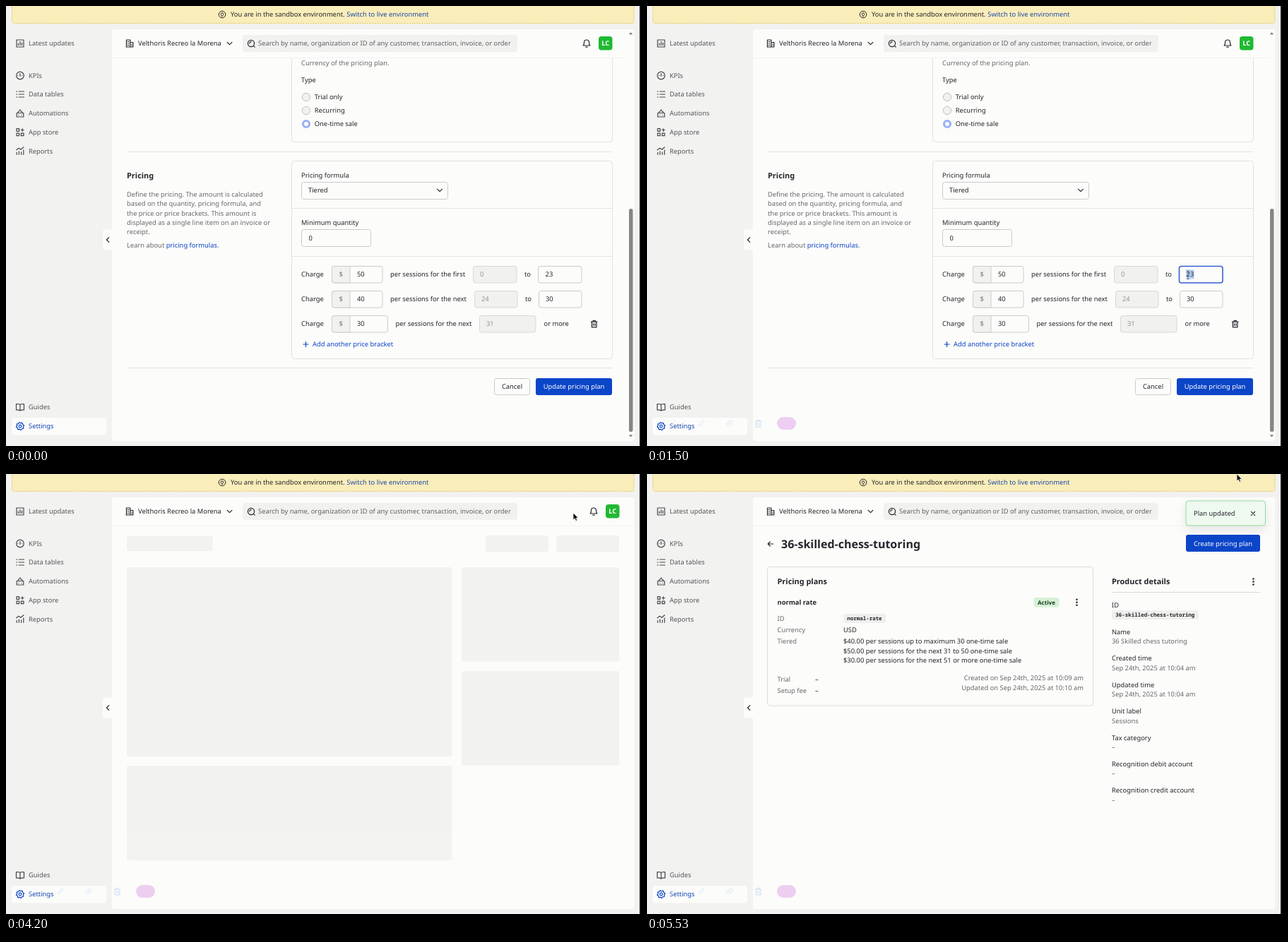
An HTML page that plays this animation: 899 by 623 pixels, repeating every 5610 ms.

```html
<!DOCTYPE html>
<html lang="en">
<head>
<meta charset="utf-8">
<title>Pricing plan</title>
<style>
  html, body { margin: 0; width: 100%; height: 100%; overflow: hidden; background: #f2f2f0; }
  svg { display: block; }
  text { font-family: "Noto Sans", "Open Sans", sans-serif; white-space: pre; text-rendering: geometricPrecision; }
  .mono { font-family: "Noto Sans Mono", "DejaVu Sans Mono", monospace; }
  .icon { fill: none; stroke-linecap: round; stroke-linejoin: round; }
</style>
</head>
<body>
<svg id="stage" width="899" height="623" viewBox="0 0 899 623"></svg>
<script>
const LOOP = 5610;
const INK = '#25262a', GREY = '#67686c', SIDE = '#55565a', MUTE = '#929395';
const BLUE = '#0b45c8', PAPER = '#fcfcfa', SOFT = '#f1f1ef', LINE = '#e2e2df', EDGE = '#cbcbc8', HEADER = '#f3f3f1';

// y is the optical middle of the line
function text(x, y, s, { c = INK, size = 9.36, w = 400, a = 'start', id, mono } = {}) {
  return `<text x="${x}" y="${y + size * 0.36}" font-size="${size}" font-weight="${w}" fill="${c}"
    text-anchor="${a}"${id ? ` id="${id}"` : ''}${mono ? ' class="mono"' : ''}>${s}</text>`;
}
function box(x, y, w, h, fill, { line = 'none', r = 3, lw = 1, more = '' } = {}) {
  return `<rect x="${x}" y="${y}" width="${w}" height="${h}" rx="${r}" fill="${fill}" stroke="${line}" stroke-width="${lw}" ${more}/>`;
}
// paths are drawn around their own centre
function icon(x, y, d, c = '#45464a', w = 1.2) {
  return `<path class="icon" transform="translate(${x} ${y})" d="${d}" stroke="${c}" stroke-width="${w}"/>`;
}
const rule = (x1, x2, y, c = LINE) => `<path d="M${x1} ${y}H${x2}" stroke="${c}"/>`;
const group = (id, body) => `<g id="${id}">${body}</g>`;
const ring = (r, x = 0, y = 0) => `M${x - r} ${y}a${r} ${r} 0 1 0 ${2 * r} 0a${r} ${r} 0 1 0 ${-2 * r} 0`;
const rows = (list, fn) => list.map(fn).join('');

// closed outline with two points per tooth tip and two per gap
function cog(teeth, outer, inner) {
  const points = Array.from({ length: teeth * 4 }, (_, i) => {
    const angle = (i + .5) * Math.PI / (2 * teeth), r = i % 4 < 2 ? outer : inner;
    return `${(r * Math.sin(angle)).toFixed(2)} ${(r * Math.cos(angle)).toFixed(2)}`;
  });
  return `M${points.join('L')}Z`;
}

const D = {
  chart: 'M-5-5H5V5H-5ZM-2.5 2.5V0M0 2.5V-2.5M2.5 2.5V-1',
  gauge: ring(5.3) + 'M0 1V-3M-3 0h.2M2.8 0h.2',
  list: 'M-1.8-4H5.5M-1.8 0H5.5M-1.8 4H5.5M-5.3-4h1M-5.3 0h1M-5.3 4h1',
  robot: 'M-4.8-.5H4.8V5H-4.8ZM-3-.5q0-3 3-3t3 3M0-3.5V-5.5M-2 2.3h.2M1.8 2.3h.2',
  apps: 'M-5-5h3.6v3.6H-5ZM-5 1.4h3.6V5H-5ZM1.4 1.4H5V5H1.4ZM3.2-5.2v4M1.2-3.2h4',
  report: 'M-5.3-1.5L-2-4 1-2 5-5.5M-4.8 5V2M-1.6 5V.5M1.6 5V1.5M4.8 5V-1.5',
  book: 'M0-3.5C-2-5-4-4.5-5.5-4.3V4C-4 3.8-2 3.6 0 5 2 3.6 4 3.8 5.5 4V-4.3C4-4.5 2-5 0-3.5V5',
  gear: ring(1.8) + cog(8, 5.5, 4.4),
  pin: ring(4.8) + 'M0 2.5C-1 1.4-1.7.5-1.7-.5a1.7 1.7 0 0 1 3.4 0C1.7.5 1 1.4 0 2.5Z',
  building: 'M-4.5 5V-5H.8V5M.8-1.5H4.8V5H-5M-2.6-2.5h1.4M-2.6 0h1.4M-2.6 2.5h1.4M2.6 1h.4M2.6 3h.4',
  search: ring(4.6) + 'M3.3 3.3L5.2 5.2M-2.3 0a2.3 2.3 0 0 1 2.3-2.3',
  bell: 'M-4.8 3H4.8C3.4 1.6 3.6 0 3.5-1.5a3.5 3.5 0 0 0-7 0C-3.6 0-3.4 1.6-4.8 3ZM-1.2 5.2H1.2',
  down: 'M-3.4-1.7L0 1.7 3.4-1.7',
  left: 'M1.8-3.4L-1.6 0 1.8 3.4',
  back: 'M3.8 0H-3.8M-.8-3L-3.8 0-.8 3',
  plus: 'M-3.5 0H3.5M0-3.5V3.5',
  cross: 'M-2.6-2.6L2.6 2.6M2.6-2.6L-2.6 2.6',
  trash: 'M-4.3-2.8H4.3M-3.3-2.8V4.8H3.3V-2.8M-1.6-2.8V-4.6H1.6V-2.8M-1.2-.5V2.5M1.2-.5V2.5',
  pencil: 'M-4 4L-3.3 1.4 2.4-4.2 4.2-2.4-1.4 3.3Z',
  link: ring(2.6, -1.8, 1.6) + ring(2.6, 1.8, -1.6),
};
const kebab = (x, y) => rows([-4, 0, 4], d => `<circle cx="${x}" cy="${y + d}" r="1.3" fill="${INK}"/>`);

function frame() {
  const nav = [
    ['Latest updates', 53, 'chart'], ['KPIs', 98.5, 'gauge'], ['Data tables', 125, 'list'],
    ['Automations', 152, 'robot'], ['App store', 178.7, 'apps'], ['Reports', 205.3, 'report'],
    ['Guides', 568, 'book'],
  ];
  return box(8.5, -6, 880.5, 30.5, '#f9edba', { line: '#e3c95c', more: 'stroke-dasharray="2 1.5"' })
    + icon(306, 12, D.pin, INK, 1)
    + text(318, 12, 'You are in the sandbox environment.')
    + text(482.3, 12, 'Switch to live environment', { c: '#1c48a8' })
    + rows(nav, ([s, y, d]) => icon(20, y, D[d]) + text(32, y, s, { c: SIDE }))
    + box(8, 583, 134, 24.5, PAPER, { r: 4 })
    + icon(20, 595, D.gear, BLUE) + text(32, 595, 'Settings', { c: '#1748b4' })
    + box(150, 33, 739.5, 583, PAPER, { r: 4 })
    + box(137, 316.5, 18, 29, PAPER, { r: 4 }) + icon(144, 331, D.left, INK)
    + icon(175, 53, D.building, INK) + text(187, 53, 'Velthoris Recreo la Morena')
    + icon(316.5, 53, D.down, INK)
    + box(335, 41, 389, 24, SOFT, { r: 4 }) + icon(347, 53, D.search, INK)
    + `<svg x="357" y="41" width="357.5" height="24">`
    + text(0, 12, 'Search by name, organization or ID of any customer, transaction, invoice, or order', { c: '#606165' })
    + '</svg>'
    + group('user', icon(822, 53, D.bell, INK) + box(839, 43, 19.5, 19.5, '#20b932', { r: 4 })
      + text(848.8, 53, 'LC', { c: '#fff', w: 600, a: 'middle' }));
}

function priceRow(y, amount, words, start, opts) {
  const { amountW, wordsX, startX, startW, id } = opts;
  return text(418, y, 'Charge')
    + box(461.5, y - 11.5, amountW + 25.5, 23.5, PAPER, { line: EDGE })
    + `<path d="M487 ${y - 11.5}h-22.5q-3 0-3 3v17.5q0 3 3 3h22.5z" fill="${SOFT}" stroke="${EDGE}"/>`
    + text(471.5, y, '$', { c: '#77787b' }) + text(497, y, amount)
    + text(wordsX, y, words)
    + box(startX + .5, y - 11.5, startW, 23.5, SOFT, { line: '#d8d8d5' })
    + text(startX + 10, y, start, { c: MUTE, id });
}

function form() {
  const about = ['Define the pricing. The amount is calculated', 'based on the quantity, pricing formula, and',
    'the price or price brackets. This amount is', 'displayed as a single line item on an invoice or', 'receipt.'];
  const radios = [['Trial only', 129], ['Recurring', 148], ['One-time sale', 167]];
  return rule(150, 880, 73.5, HEADER)
    + `<path d="M404.5 74V188.5q0 4 4 4H854.5q4 0 4-4V74" fill="none" stroke="${LINE}"/>`
    + text(418, 81, 'Currency of the pricing plan.', { c: GREY }) + text(418, 105, 'Type')
    + rows(radios, ([s, y], i) => (i < 2
      ? `<circle cx="425" cy="${y}" r="5.7" fill="${SOFT}" stroke="#c3c3c1"/>`
      : `<circle cx="425" cy="${y}" r="4.5" fill="#fff" stroke="#98b2f6" stroke-width="3.2"/>`) + text(436.8, y, s))
    + rule(171, 858, 206.5, '#e4e4ec')
    + text(171, 240, 'Pricing', { size: 10.92, w: 700 })
    + rows(about, (s, i) => text(171, 266.5 + i * 13.4, s, { c: GREY }))
    + text(171, 339, `Learn about <tspan fill="${BLUE}">pricing formulas</tspan>.`, { c: GREY })
    + box(404.5, 219.5, 454, 280, 'none', { line: LINE, r: 4 })
    + rule(405, 858, 286.5) + rule(405, 858, 354.5)
    + text(418, 240, 'Pricing formula') + box(418.5, 249.5, 207, 24, PAPER, { line: EDGE })
    + text(428, 261, 'Tiered') + icon(614, 261, D.down, INK)
    + text(418, 307, 'Minimum quantity') + box(418.5, 316.5, 98, 24, PAPER, { line: EDGE }) + text(428.5, 328.7, '0')
    + priceRow(380, '50', 'per sessions for the first', '0', { amountW: 46, wordsX: 544, startX: 661, startW: 61.5 })
    + text(734, 380, 'to') + box(753.5, 368.5, 61.5, 23.5, PAPER, { line: EDGE, more: 'id="field"' })
    + box(763, 373.5, 11.5, 13, '#b5d0f8', { r: 0, more: 'id="pick"' })
    + text(763.6, 380, '', { id: 'limit' }) + box(774.6, 374, 1, 12.5, INK, { r: 0, more: 'id="caret"' })
    + priceRow(415, '40', 'per sessions for the next', '', { amountW: 46, wordsX: 544, startX: 663, startW: 60.5, id: 'from' })
    + text(735, 415, 'to') + box(754.5, 403.5, 60.5, 23.5, PAPER, { line: EDGE }) + text(764, 415, '30')
    + priceRow(450, '30', 'per sessions for the next', '31', { amountW: 53.5, wordsX: 551.5, startX: 670, startW: 79.5 })
    + text(761.5, 450, 'or more') + icon(832.7, 450, D.trash, INK)
    + icon(424.5, 479, D.plus, BLUE) + text(434, 479, 'Add another price bracket', { c: BLUE })
    + rule(171, 858, 512.5)
    + box(691.5, 527.5, 50, 23, PAPER, { line: EDGE }) + text(716.5, 539, 'Cancel', { a: 'middle' })
    + box(750, 527, 108, 24, BLUE, { more: 'id="save"' }) + text(804, 539, 'Update pricing plan', { c: '#fff', a: 'middle' })
    + box(882, 287, 5.5, 316, '#868686', { r: 2.7 })
    + '<path d="M881.8 40.2h5.4l-2.7-3zM881.8 607.3h5.4l-2.7 3z" fill="#77787b"/>';
}

function skeleton() {
  const parts = [[171, 88, 122, 21], [679, 87, 89, 23], [779, 87, 89, 23], [171, 132, 460.5, 268],
    [645, 132, 223, 133.5], [645, 279, 223, 133.5], [171, 413, 460.5, 134]];
  return rows(parts, p => box(...p, '#f2f2f1', { r: 3 }));
}

function chip(x, y, w, s) {
  return box(x, y - 6.5, w, 13, '#efefed') + text(x + 5.3, y, s, { size: 7.47, w: 700, mono: true });
}

function detail() {
  const head = { size: 10.92, w: 700 }, soft = { c: GREY };
  const plan = [['ID', 204.5], ['Currency', 221], ['Tiered', 237], ['Trial', 290.5], ['Setup fee', 307]];
  const prices = ['$40.00 per sessions up to maximum 30 one-time sale', '$50.00 per sessions for the next 31 to 50 one-time sale',
    '$30.00 per sessions for the next 51 or more one-time sale'];
  const facts = [['Name', '36 Skilled chess tutoring'], ['Created time', 'Sep 24th, 2025 at 10:04 am'],
    ['Updated time', 'Sep 24th, 2025 at 10:04 am'], ['Unit label', 'Sessions'], ['Tax category', '–'],
    ['Recognition debit account', '–'], ['Recognition credit account', '–']];
  return icon(175, 99, D.back, INK) + text(190, 99, '36-skilled-chess-tutoring', { size: 16, w: 700 })
    + box(763, 86, 105, 24, BLUE) + text(815.5, 98.3, 'Create pricing plan', { c: '#fff', a: 'middle' })
    + box(170.5, 131.5, 461, 196.5, 'none', { line: '#dcdcd9', r: 4 })
    + text(184.5, 152, 'Pricing plans', head)
    + text(184.5, 181.7, 'normal rate', { w: 700 })
    + box(547.5, 175, 36, 13.5, '#d5f1d4', { r: 4 }) + text(565.5, 181.7, 'Active', { size: 8, w: 700, a: 'middle', c: '#1d3a22' })
    + kebab(608.5, 181.7)
    + rows(plan, ([s, y]) => text(184.5, y, s, soft))
    + chip(278, 204.5, 60, 'normal-rate') + text(278, 221, 'USD')
    + rows(prices, (s, i) => text(278, 237 + i * 13.4, s))
    + text(238, 290.5, '–') + text(238, 307, '–')
    + text(618, 289, 'Created on Sep 24th, 2025 at 10:09 am', { c: GREY, a: 'end' })
    + text(618, 302.4, 'Updated on Sep 24th, 2025 at 10:10 am', { c: GREY, a: 'end' })
    + text(658, 152, 'Product details', head) + kebab(858.5, 152.5) + rule(658, 868, 167.5, '#d9d9d6')
    + text(658, 185.5, 'ID') + chip(658, 199.5, 123, '36-skilled-chess-tutoring')
    + rows(facts, ([k, v], i) => text(658, 223.7 + i * 37.4, k) + text(658, 237.1 + i * 37.4, v, soft));
}

function recorder() {
  const faint = [[37, 'pencil', .25], [77, 'pencil', .5], [117, 'link', .6], [157.5, 'trash', 1]];
  return rows(faint, ([x, d, o]) => `<g opacity="${o}">${icon(x, 591, D[d], '#d3e4f3')}</g>`)
    + box(184, 582, 27, 18, '#edcef1', { r: 9 });
}

const toast = () => '<g filter="url(#shade)">' + box(763, 38, 112.5, 35, '#eef9ef', { line: '#8edb9f', r: 4 }) + '</g>'
  + text(774, 56, 'Plan updated') + icon(858, 56, D.cross, INK);

const pointers = {
  arrow: '<path d="M0 0V10L2.3 7.9 3.9 11.4 5.6 10.6 4.1 7.3H7.2Z" fill="#111" stroke="#fff" stroke-width=".7"/>',
  beam: '<path d="M-1.8-6.2Q0-6.2 0-5V5Q0 6.2-1.8 6.2M1.8-6.2Q0-6.2 0-5M0 5Q0 6.2 1.8 6.2" fill="none" stroke="#66676b" stroke-width=".9"/>',
  hand: '<path d="M-1.3 1V-4.5q1.2-1.3 2.2 0V-1.5q1.3-.6 1.9.3 1.2-.4 1.7.5 1.3 0 1.3 1.2V3L4.6 6H-.6L-3.8 1.7q.8-1.4 2.5-.7Z" fill="#fff" stroke="#111" stroke-width=".9"/>',
};

const $ = id => document.getElementById(id);
$('stage').innerHTML = '<defs><filter id="shade" x="-30%" y="-60%" width="160%" height="260%">'
  + '<feDropShadow dx="0" dy="6" stdDeviation="7" flood-color="#000" flood-opacity=".09"/></filter></defs>'
  + frame() + group('form', form())
  + group('wide', rule(150, 889, 73.5, HEADER))
  + group('skeleton', skeleton()) + group('detail', detail())
  + group('recorder', recorder()) + group('toast', toast())
  + box(897, 0, 2, 623, '#1b1b1b', { r: 0 })
  + group('pointer', rows(Object.entries(pointers), ([k, p]) => group(k, p)));

const CLICK = 1330, PICK = 1500, KEY1 = 1950, KEY2 = 2200, SAVE = 3720, LOADING = 3900, LOADED = 4780;
const TOAST = 4007, TOAST_MS = 700;
const path = [[380, 902, 300], [680, 770, 364], [1150, 770, 364], [1300, 766, 381], [1850, 766, 381], [2300, 755, 380],
  [2520, 755, 380], [2750, 773, 364], [2980, 773, 364], [3340, 774, 545], [3760, 774, 545],
  [3980, 786, 300], [4200, 803, 55], [4390, 835, 0]];
const bounce = [[0, 3000], [.6, -25], [.75, 10], [.9, -5], [1, 0]];
const smooth = p => p * p * (3 - 2 * p);
const easeOut = p => 1 - (1 - p) ** 3;

// value of a keyed track at t; column picks the value
function at(track, t, column, ease) {
  const i = track.findIndex(k => k[0] > t);
  if (i === 0) return track[0][column];
  if (i < 0) return track[track.length - 1][column];
  const a = track[i - 1], b = track[i];
  return a[column] + (b[column] - a[column]) * ease((t - a[0]) / (b[0] - a[0]));
}
const show = (id, on) => { $(id).style.display = on ? '' : 'none'; };
const within = (x, y, l, t, r, b) => x >= l && x <= r && y >= t && y <= b;

function draw(t) {
  const editing = t < LOADING, loaded = t >= LOADED;
  show('form', editing);
  show('wide', !editing);
  show('skeleton', !editing && !loaded);
  show('detail', loaded);
  show('recorder', t >= 300);
  $('user').setAttribute('transform', `translate(${editing ? 0 : 10} 0)`);
  $('skeleton').style.opacity = .65 + .35 * Math.cos((t - 4130) / 320 * Math.PI);

  const focus = t >= CLICK && t < SAVE;
  const typed = t < KEY1 ? 23 : t < KEY2 ? 5 : 50;
  $('limit').textContent = typed;
  $('from').textContent = typed + 1;
  $('field').setAttribute('stroke', focus ? '#3760d6' : EDGE);
  $('field').setAttribute('stroke-width', focus ? 1.6 : 1);
  show('pick', t >= PICK && t < KEY1);
  show('caret', focus && t >= KEY1 && (t < KEY2 || (t - KEY2) % 1000 < 500));
  $('caret').setAttribute('x', typed === 5 ? 769.2 : 774.6);

  const x = at(path, t, 1, smooth), y = at(path, t, 2, smooth);
  const overSave = editing && within(x, y, 750, 527, 858, 551);
  const overField = editing && within(x, y, 753, 368, 815, 392);
  $('save').setAttribute('fill', overSave ? '#0a369f' : BLUE);
  show('pointer', t >= path[0][0]);
  show('hand', overSave);
  show('beam', overField);
  show('arrow', !overSave && !overField);
  $('pointer').setAttribute('transform', `translate(${x} ${y})`);

  show('toast', t >= TOAST);
  $('toast').setAttribute('transform', `translate(${at(bounce, (t - TOAST) / TOAST_MS, 1, easeOut)} 0)`);
}

function tick() {
  draw(performance.now() % LOOP);
  requestAnimationFrame(tick);
}
tick();
</script>
</body>
</html>
```
